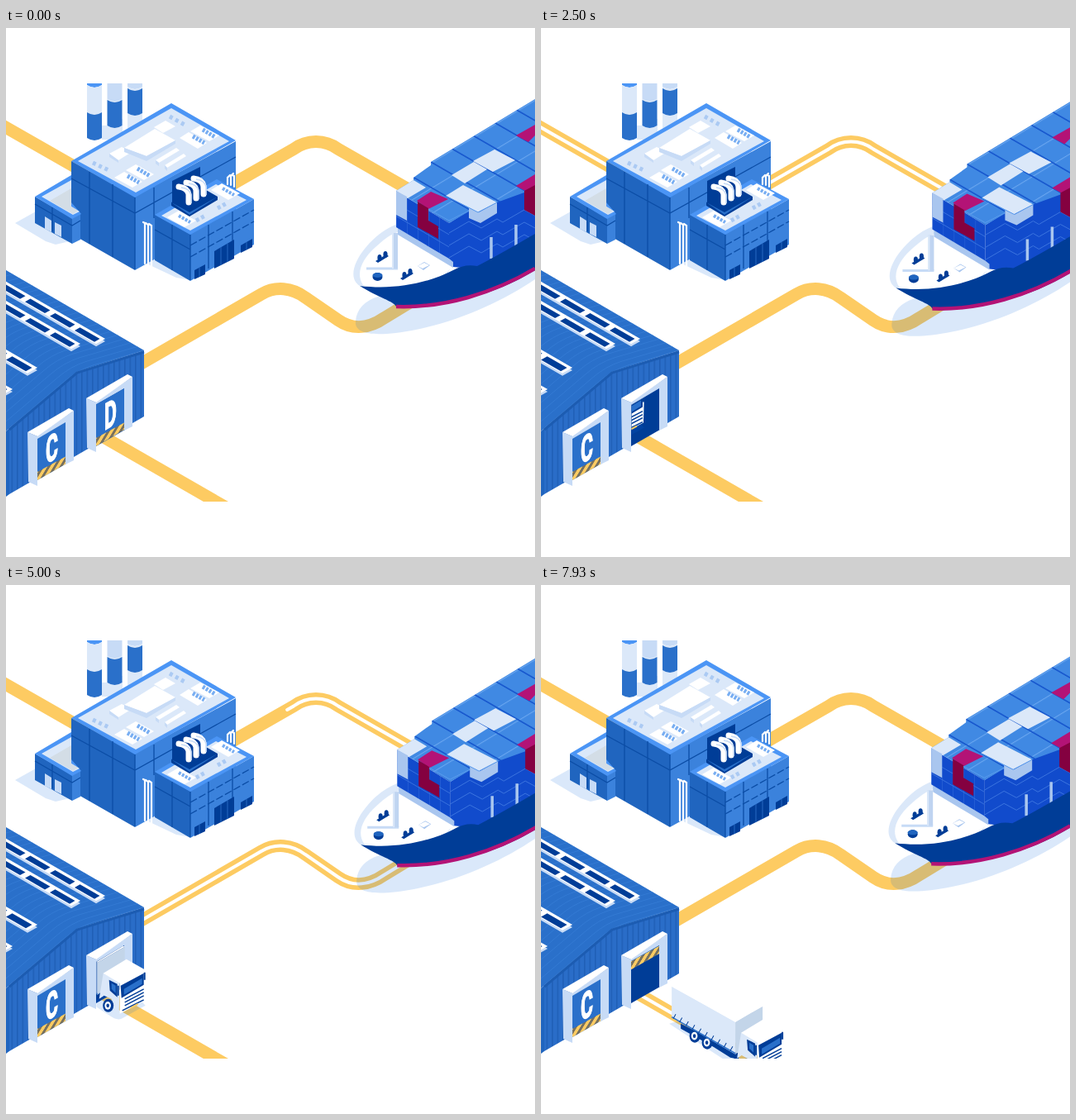
Animation of 640 by 640 pixels, one loop 8 s. Source, as an HTML page:

```html
<!DOCTYPE html>
<html lang="en">
<head>
<meta charset="utf-8">
<title>Logistics route</title>
<style>
html, body { margin: 0; height: 100%; overflow: hidden; background: #fff; }
svg { display: block; width: 100vw; height: 100vh; fill: none; }
.road { stroke: #fdcb62; stroke-width: 15; }
.lane { stroke: #fff; stroke-width: 4; stroke-linecap: round; }
.shade { fill: rgba(8, 102, 222, .15); }
.white { fill: #fff; }
.pale { fill: #dbe8f9; }
.ice { fill: #c7dbf6; }
.steel { fill: #a9c6ef; }
.sky { fill: #4b95f5; }
.light { fill: #3b82dc; }
.mid { fill: #2a70ca; }
.deep { fill: #2065bf; }
.navy { fill: #003d97; }
.royal { fill: #114bcc; }
.pink { fill: #b31376; }
.wine { fill: #840140; }
.seam { stroke: #0b4da6; stroke-width: 1.3; }
.pipe { stroke: #fff; stroke-linecap: round; }
text { font: 700 44px Roboto, Arial, sans-serif; fill: #fff; stroke: #fff; stroke-width: 1.6; text-anchor: middle; }
</style>
</head>
<body>
<svg viewBox="0 0 640 640">
<defs>
  <clipPath id="stage"><path d="M0 67H640V573H0z"/></clipPath>
  <clipPath id="roofClip"><path d="M0 293L167 390 86 416 4 484 0 488z"/></clipPath>
  <clipPath id="opening"><path d="M38 496L72 477V527L38 547z"/></clipPath>
  <clipPath id="exit"><path d="M109.500 456L143 436H640V640H109.500z"/></clipPath>
  <pattern id="ribs" width="6.500" height="10" patternUnits="userSpaceOnUse">
    <rect width="6.500" height="10" fill="#2a6dc8"/><rect width="1.500" height="10" fill="#1f5fb6"/>
  </pattern>
  <pattern id="hazard" width="11" height="10" patternUnits="userSpaceOnUse" patternTransform="matrix(1 -.55 -.6 1 0 0)">
    <rect width="11" height="10" fill="#fdcb62"/><rect width="5" height="10" fill="#77715f"/>
  </pattern>
  <pattern id="lids" width="1" height="1" patternUnits="userSpaceOnUse" patternTransform="matrix(26 15 26 -15.700 514 163)">
    <rect width="1" height="1" fill="#4089e3"/><rect width=".04" height="1" fill="#6ba7f0"/><rect width="1" height=".06" fill="#1656cd"/>
  </pattern>
  <pattern id="fronts" width="1" height="1" patternUnits="userSpaceOnUse" patternTransform="matrix(13 7.600 0 15 472 197)">
    <rect width="1" height="1" fill="#114bcc"/><rect width=".05" height="1" fill="#2a62d6"/><rect width="1" height=".06" fill="#3b74df"/>
  </pattern>
  <g id="frame">
    <path class="ice" d="M26 489L38 494V554L27 549zM38 493L82 463V523L72 528V477L38 497z"/>
    <path class="white" d="M26 489L76 460 82 463 38 494z"/>
  </g>
  <g id="panel">
    <path class="mid" d="M38 496L73 476V527L38 547z"/>
    <path fill="url(#hazard)" d="M38 537L73 518V527L38 547z"/>
  </g>
  <g id="wheel">
    <ellipse class="navy" rx="6.500" ry="8"/><ellipse class="white" cx="-.5" rx="3.800" ry="4.800"/><ellipse class="navy" cx="-.5" rx="1.800" ry="2.400"/>
  </g>
  <g id="bollard">
    <path class="navy" d="M-8 4L5-4 8-2-5 6z"/><ellipse class="navy" cx="-3" rx="2.600" ry="4"/><ellipse class="navy" cx="4" cy="-4" rx="2.600" ry="4"/>
  </g>
</defs>

<g clip-path="url(#stage)">
  <g id="roads"></g>

  <!-- factory -->
  <path class="shade" d="M11 236L36 222 90 255 60 262 48 258zM170 285L181 278 224 305 206 302z"/>
  <path class="pale" d="M116 118H123V135H116zM123 110H141V138H123zM147 95H165V130H147z"/>
  <g id="chimneys"></g>
  <path class="deep" d="M79 161L156 204V293L79 249zM35 204L80 230V261L35 236z"/>
  <path class="light" d="M156 204L278 137V225L156 293zM80 230L90 225V256L80 261z"/>
  <path class="sky" d="M79 161L200 91 278 136 156 205zM35 204L79 178V211L91 225 80 231z"/>
  <path class="pale" d="M87 161L200 97 270 137 157 199zM43 204L79 184V216L89 222 81 226z"/>
  <path fill="#d3dde6" d="M53 209L79 194V216L87 221 81 225z"/>
  <path class="seam" d="M79 182L156 224 278 156M101 174V261M129 189V277M156 205V292M179 193V230M35 213L80 239 90 233M56 217V246"/>
  <path class="ice" d="M47 228L55 233V247L47 243zM59 235L67 239V253L59 249z"/>
  <path class="white" d="M143 145L180 122 205 136 170 155zM125 152L140 144 152 150 136 160zM179 120L193 112 205 119 190 127zM131 181L143 174 165 186 153 193zM145 172L157 165 179 177 167 184zM210 133L221 126 243 139 232 146zM223 125L235 118 258 130 246 137zM181 160L206 145 210 148 185 163zM192 166L215 152 218 155 195 169z"/>
  <path class="ice" d="M143 145L170 155V161L143 150zM170 155L205 136V140L170 161zM125 152L136 160V163L125 156zM181 160L185 163V167L181 164zM192 166L195 169V173L192 170z"/>
  <g stroke="#78aef2" stroke-width="5">
    <path stroke-dasharray="3 1.500" d="M147 179L161 187M159 170L174 179M226 131L240 139M238 123L253 132"/>
    <path stroke="#abcaf3" stroke-dasharray="4 4" d="M105 163L124 172M198 107L216 117"/>
  </g>
  <path class="navy" d="M201 185L235 168V199L201 216z"/>
  <path class="deep" d="M180 226L223 250V306L180 281z"/>
  <path class="light" d="M223 250L300 207V262L223 306z"/>
  <path class="sky" d="M180 226L255 183 300 207 223 250z"/>
  <path class="pale" d="M188 227L254 189 291 208 223 245z"/>
  <path class="white" d="M195 229L209 221 230 233 216 241zM248 196L261 188 283 200 269 208z"/>
  <path stroke="#78aef2" stroke-width="4" stroke-dasharray="3 1.500" d="M209 227L223 235M262 194L276 202"/>
  <path stroke="#abcaf3" stroke-width="5" stroke-dasharray="4 3" d="M230 233L241 227M256 218L267 212"/>
  <path class="seam" d="M180 244L223 268M201 238V293M223 250V305M245 238V291M274 222V273"/>
  <path class="seam" stroke-dasharray="9 3" d="M223 263L300 220M223 277L300 234"/>
  <path class="navy" d="M228 293L241 286V298L228 304zM252 270L276 256V279L252 291zM284 263L298 255V265L284 272z"/>
  <path stroke="#2668c1" d="M234 290V301M260 265V287M268 261V283M291 259V268"/>
  <path class="navy" d="M200 211L235 192 256 204 222 224zM200 211L222 224V228L200 215zM222 224L256 204V208L222 228z"/>
  <path class="mid" d="M200 211L222 223 256 204 222 226z"/>
  <g id="pipes"></g>
  <path class="pipe" stroke-width="2.200" d="M168 285V236l-2-1M172 288V238l-3-2M176 290V239l-3-2M268 189V181l3-3M272 190V179l3-3M276 192V179l-2-1"/>

  <!-- ship -->
  <g id="ship">
    <path class="shade" d="M423 355C424 340 434 330 450 325L640 270V304C600 331 550 354 496 365 450 374 421 372 423 355z"/>
    <path class="pale" d="M428 312C414 303 421 283 434 267 446 252 460 242 474 237L541 284 530 305z"/>
    <path class="white" d="M432 311C422 296 432 279 446 266 456 257 464 250 474 247L541 288 520 308 470 316z"/>
    <path class="steel" d="M474 241L541 280V290L474 250z"/>
    <path fill="url(#fronts)" d="M472 197L536 236V279L472 241z"/>
    <path class="royal" d="M536 236L560 221 640 170V262L570 292 541 289V283L536 279z"/>
    <g id="tiers" stroke="#3b74df"></g>
    <path fill="url(#lids)" d="M472 197L493 184V181L514 166V162L640 86V192L627 199 594 211 560 222 536 236z"/>
    <path class="pale" d="M472 197L493 184 508 193 486 206zM532 203L553 190 594 211 571 223zM539 178L566 162 582 171 555 188zM565 161L591 147 616 160 589 174z"/>
    <path class="steel" d="M472 197L485 204V233L472 226zM560 217L572 223 594 211V224L574 236 560 230z"/>
    <path class="pink" d="M497 209L514 198 535 207 511 219zM617 130L640 117V130L632 138zM617 191L640 177V192L630 198z"/>
    <path class="wine" d="M498 210L511 218V233L523 240V255L498 241zM627 197L640 190V227L627 220z"/>
    <path stroke="#5a9bed" d="M511 219L536 233 560 221M532 203L571 223 594 211"/>
    <path class="steel" d="M498 288L506 283 513 287 505 293z"/>
    <path class="white" d="M498 288L506 284 512 287 504 291z"/>
    <path stroke="#c7dbf6" stroke-width="3" d="M436 291H474"/>
    <path stroke="#bfd4f1" stroke-width="7" d="M470.500 248V291"/>
    <path stroke="#dbe8f9" stroke-width="2" d="M468 248V291"/>
    <path stroke="#a9c6ef" stroke-width="3.500" d="M587 253V279M617 238V264"/>
    <use href="#bollard" x="455" y="278"/><use href="#bollard" x="485" y="299"/>
    <ellipse class="navy" cx="449.500" cy="301" rx="6" ry="5"/><ellipse class="deep" cx="449.500" cy="299" rx="6" ry="3"/>
    <path class="navy" d="M428 312C470 317 510 309 541 293Q555 285 570 288 590 278 640 249V293C590 324 530 338 472 337 470 331 450 326 428 312z"/>
    <path stroke="#b31376" stroke-width="4.500" d="M472 337C530 339 590 321 640 291"/>
  </g>

  <!-- warehouse -->
  <path class="mid" d="M0 293L167 390 86 416 4 484 0 488z"/>
  <g clip-path="url(#roofClip)"><g id="ridges" stroke="#3b82da" stroke-width="1" opacity=".6"></g></g>
  <g id="skylights"></g>
  <path fill="url(#ribs)" d="M167 390L86 416 4 484V564L167 470z"/>
  <path class="deep" d="M0 488L4 484V564L0 567z"/>
  <path stroke="#1c5cb2" stroke-width="3" d="M167 392L86 417 4 486"/>
  <use href="#panel"/>
  <text transform="matrix(.52 -.3 0 1 55.500 523.500)">C</text>
  <use href="#frame"/>
  <g transform="translate(71 -41)">
    <path class="navy" d="M38 496L73 476V527L38 547z"/>
    <use href="#frame"/>
  </g>

  <g clip-path="url(#exit)">
    <g id="truck">
      <path class="shade" d="M102 500L135 490 222 530 240 550 211 566Q205 568 198 563z"/>
      <path class="navy" d="M116 500L182 533V543L116 506zM157 523L186 536V543L176 541 157 529z"/>
      <use href="#wheel" x="133" y="515"/><use href="#wheel" x="148" y="523"/>
      <path class="pale" d="M105 455L182 498V537L105 492z"/>
      <path fill="#c3d5e9" d="M182 498L215 479V512L182 537z"/>
      <path class="white" d="M105 455L137 435 215 479 182 498z"/>
      <path stroke="#2a70ca" stroke-width="1.500" d="M105 492L182 536"/>
      <path stroke="#003d97" stroke-width="6" stroke-dasharray="1 7.800" d="M108 491L182 533"/>
      <path class="pale" d="M189 511L209 522 208 560 202 556 199 542 190 538 184 542z"/>
      <path class="white" d="M189 511L217 494 240 507 209 523zM209 522L240 507 239 544 209 560z"/>
      <path class="navy" d="M210 526L238 511V525L211 541zM196 519L206 524V540L197 532z"/>
      <path class="mid" d="M214 530L236 517V524L214 537zM199 523L204 526V535L199 530z"/>
      <path stroke="#003d97" stroke-width="1.500" d="M215 542L238 530M215 546L238 534M215 550L238 538M212 556L238 543"/>
      <path stroke="#fdcb62" stroke-width="2" d="M222 553L231 548"/>
      <path stroke="#003d97" stroke-width="2" d="M207 526V538M239 510V519"/>
      <use href="#wheel" x="195" y="550"/>
    </g>
  </g>
  <g transform="translate(71 -41)" clip-path="url(#opening)">
    <g id="door">
      <use href="#panel"/>
      <text transform="matrix(.52 -.3 0 1 55.500 523.500)">D</text>
    </g>
  </g>
</g>
</svg>
<script>
const LOOP = 8000;
const byId = id => document.getElementById(id);
const clamp01 = v => Math.min(1, Math.max(0, v));
const repeat = (n, make) => Array.from({ length: n }, (_, i) => make(i)).join('');

// Each lane fills from its "fill" time and empties from its "clear" time.
const routes = [
  { d: 'M-20 109L185 226Q197 233 209 226L348 146.500C364 134.500 386 134.500 402 146.500L492 198', fill: 784, clear: 4042 },
  { d: 'M500 325L458 350.500C440 363 420 366 402 353.500L362 326C346 314 326 312 309 322L140 419.500', fill: 3063, clear: 6395 },
  { d: 'M100 484.500L300 599.500', fill: 6330, clear: LOOP }
];
byId('roads').innerHTML = routes.map(r => `<path class="road" d="${r.d}"/><path class="lane" d="${r.d}"/>`).join('');
const lanes = document.querySelectorAll('.lane');

function chimney(x, lightTop, blueTop, bottom) {
  const column = (from, to, cls) =>
    `<path class="${cls}" d="M${x} ${from}Q${x + 9} ${from + 6} ${x + 18} ${from}V${to}Q${x + 9} ${to + 6} ${x} ${to}z"/>`;
  return column(60, lightTop, lightTop > 70 ? 'ice' : 'sky') + column(lightTop, blueTop, 'pale') + column(blueTop, bottom, 'mid');
}
byId('chimneys').innerHTML = chimney(98, 69, 102, 133) + chimney(122.500, 86, 87, 118) + chimney(147, 71, 73, 103);

byId('pipes').innerHTML = repeat(3, i => {
  const d = `M${209 + i * 9} ${192 - i * 5}q10 1 12 9v10`;
  return `<path class="pipe" stroke-width="7" d="${d}"/><path stroke="#c7dbf6" stroke-width="1.500" d="${d}" transform="translate(3 1)"/>`;
});

byId('tiers').innerHTML = repeat(3, i =>
  `<path transform="translate(0 ${i * 15})" d="M536 248L560 234 575 242 594 231 601 235 627 220 640 227"/>`);

byId('ridges').innerHTML = repeat(28, i =>
  `<path transform="translate(${-8 * i} ${-4.6 * i})" d="M220 374L167 390 105 408Q86 414 70 428L4 484"/>`);

// A row of roof windows running up-left from its right-hand corner.
function skylight(x, y, width, panes) {
  const point = (along, across, drop = 0) =>
    `${x - along - across} ${y - along * .577 + across * .56 + drop} `;
  const quad = (from, to, near, far, cls, drop) =>
    `<path class="${cls}" d="M${point(from, near, drop)}L${point(to, near, drop)}${point(to, far, drop)}${point(from, far, drop)}z"/>`;
  return quad(0, 140, 0, width, 'ice', 3) + quad(0, 140, 0, width, 'white', 0) +
    repeat(panes, i => quad(4 + i * 30, 28 + i * 30, 2.5, width - 2, 'navy', 1));
}
byId('skylights').innerHTML = skylight(120, 376, 11, 4) + skylight(90, 382, 11, 3) +
  skylight(38, 411, 12, 2) + skylight(8, 437, 12, 1);

function draw(t) {
  routes.forEach((route, i) => {
    const head = Math.max(0, (t - route.fill) * .489);
    const tail = Math.max(0, (t - route.clear) * .43);
    lanes[i].style.display = head > 0 ? '' : 'none';
    lanes[i].setAttribute('stroke-dasharray', `0 ${tail} ${Math.max(0, head - tail)} 2000`);
  });

  const seconds = Math.max(0, t - 1850) / 1000;
  const travel = 4.6 * seconds ** 2 - 117;
  byId('truck').setAttribute('transform', `translate(${travel} ${travel * .577})`);

  const lift = 52 * (clamp01((t - 400) / 1750) - clamp01((t - 7550) / 1750));
  byId('door').setAttribute('transform', `translate(0 ${-lift})`);

  const sway = .5 - .5 * Math.cos(2 * Math.PI * t / 7200);
  byId('ship').setAttribute('transform', `translate(${1.8 * sway} ${3.2 * sway})`);
}

function tick() {
  draw(performance.now() % LOOP);
  requestAnimationFrame(tick);
}
tick();
</script>
</body>
</html>
```
